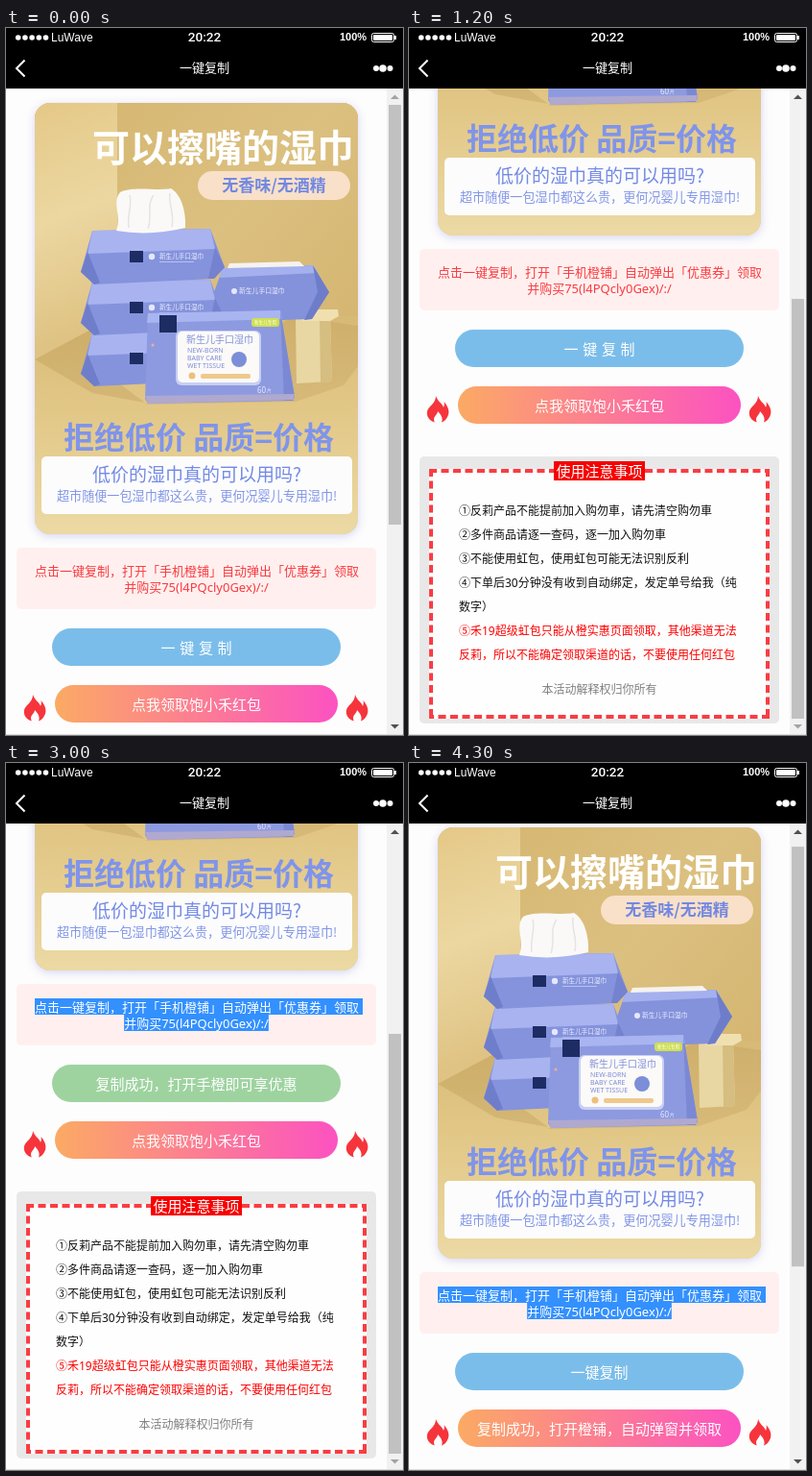
Write an HTML page with a canvas that moves like this. It is 414 px wide and 736 px high and loops after 4900 ms.

```html
<!DOCTYPE html>
<html lang="zh-CN">
<head>
<meta charset="utf-8">
<title>一键复制</title>
<style>
  html, body { margin: 0; width: 100%; height: 100%; overflow: hidden; background: #fdfdfd; }
  canvas { display: block; }
</style>
</head>
<body>
<canvas id="stage" width="414" height="736"></canvas>
<script>
const ctx = document.getElementById('stage').getContext('2d');
const W = 414, H = 736, TOP = 63, LOOP = 4900, PAGE = 984;
const SANS = '"Noto Sans", "Noto Sans CJK SC", sans-serif';
const CJK = '"Noto Sans CJK SC", sans-serif';

// [time, scroll offset]: the page jumps at each time and rests in between
const SCROLL = [
  [0, 0], [700, 25], [800, 62], [900, 100], [1000, 137], [1100, 230], [1200, 311],
  [1800, 168], [1900, 0], [2800, 100], [2900, 248], [3000, 311],
  [4100, 298], [4200, 150], [4300, 11]
];

const FLAME = new Path2D('M10 0C12 6 17 8 18 12C19 10 19 8 18.5 6C23 11 25 17 22 22' +
  'C20.5 25 18 27 16 27.5C18 23 15 19 12 16C12 19 8 21 8 24C8 26 8.5 27 9 27.5' +
  'C3 26 0 21 1 16C2 11 10 8 10 0Z');
const TISSUE = new Path2D('M115 211C121 196 110 182 119 171C132 164 158 170 172 167' +
  'C184 174 188 194 187 208Q150 217 115 211Z');
const FOLDS = new Path2D('M128 208C126 194 132 184 129 174M148 209C153 196 146 184 154 174' +
  'M173 207C176 194 169 182 171 172');

function rect(x, y, w, h, color) {
  ctx.fillStyle = color;
  ctx.fillRect(x, y, w, h);
}

function round(x, y, w, h, r, color) {
  ctx.beginPath();
  ctx.roundRect(x, y, w, h, r);
  ctx.fillStyle = color;
  ctx.fill();
}

function dot(x, y, r, color) {
  ctx.beginPath();
  ctx.arc(x, y, r, 0, Math.PI * 2);
  ctx.fillStyle = color;
  ctx.fill();
}

function trace(points, x = 0, y = 0) {
  ctx.beginPath();
  for (let i = 0; i < points.length; i += 2) ctx.lineTo(points[i] + x, points[i + 1] + y);
}

function poly(color, points, x, y) {
  trace(points, x, y);
  ctx.closePath();
  ctx.fillStyle = color;
  ctx.fill();
}

function line(color, width, points) {
  trace(points);
  ctx.strokeStyle = color;
  ctx.lineWidth = width;
  ctx.stroke();
}

function fade(x0, y0, x1, y1, ...colors) {
  const g = ctx.createLinearGradient(x0, y0, x1, y1);
  colors.forEach((c, i) => g.addColorStop(i / (colors.length - 1), c));
  return g;
}

// y is the middle of the glyphs
function text(str, x, y, size, color, { weight = 400, family = SANS, align = 'left', gap = 0 } = {}) {
  ctx.font = `${weight} ${size}px ${family}`;
  ctx.textAlign = align;
  ctx.letterSpacing = gap + 'px';
  ctx.fillStyle = color;
  ctx.fillText(str, x, y + size * 0.38);
}

function stackedPack(y) {
  poly('#8593dc', [12, 0, 135, -2, 150, 38, 139, 50, 14, 56, 0, 43], 78, y);
  poly('#a8b3f0', [12, 0, 135, -2, 140, 19, 7, 24], 78, y);
  poly('#6f7ecb', [7, 22, 20, 54, 14, 56, 0, 43], 78, y);
  poly('#7482cf', [140, 17, 150, 38, 139, 50, 133, 50], 78, y);
  rect(129, y + 21, 14, 12, '#1d2c62');
  dot(152, y + 27, 3.2, '#e4e8ff');
  text('新生儿手口湿巾', 160, y + 26, 6.6, '#eef0ff', { family: CJK });
  rect(160, y + 32, 36, 1, '#b9c2f3');
}

function frontPack() {
  poly('#8d9ae0', [148, 297, 286, 294, 301, 384, 299, 388, 148, 391, 145, 386]);
  poly('#a9b5f1', [148, 297, 286, 294, 288, 303, 147, 307]);
  poly('#7b89d5', [286, 294, 301, 384, 299, 388, 290, 388]);
  poly('#b0a9cf', [145, 383, 301, 381, 300, 387, 148, 391]);
  rect(160, 299, 18, 18, '#1d2c62');
  round(256, 302, 29, 9, 3, '#cfe052');
  text('新生儿专用', 259, 306.5, 4.6, '#ffffff', { family: CJK });
  dot(153, 330, 1.5, '#f3ad92');
  round(177, 315, 89, 57, 6, '#c9cff2');
  round(179, 316, 85, 53, 5, '#fbfaf8');
  text('新生儿手口湿巾', 188, 324, 10, '#8390da', { family: CJK });
  ['NEW-BORN', 'BABY CARE', 'WET TISSUE'].forEach((s, i) =>
    text(s, 189, 335 + i * 8, 7, '#7f8cd8', { weight: 500 }));
  dot(243, 345, 8, '#7d8ed8');
  dot(194, 362, 3.5, '#eebf7c');
  round(203, 360, 52, 5, 2, '#efc98c');
  text('60', 262, 377, 8, '#e8ebff');
  text('片', 272, 377.5, 5, '#e8ebff', { family: CJK });
}

function sidePack() {
  poly('#e8d7a3', [302, 303, 338, 300, 340, 368, 303, 370]);
  poly('#d6bd80', [327, 301, 338, 300, 340, 368, 328, 369]);
  poly('#f0e0b0', [309, 293, 346, 293, 347, 300, 338, 305, 309, 305]);
  poly('#8492db', [226, 250, 320, 247, 337, 275, 319, 303, 224, 306, 213, 286]);
  poly('#a5b0ee', [226, 250, 320, 247, 325, 255, 222, 260]);
  poly('#6e7dca', [320, 247, 337, 275, 319, 303, 311, 304, 325, 275]);
  poly('#f6f3ef', [233, 245, 306, 243, 311, 248, 231, 250]);
  dot(238, 274, 3, '#e4e8ff');
  text('新生儿手口湿巾', 243, 273, 6.8, '#eef0ff', { family: CJK });
}

function photo() {
  ctx.save();
  ctx.beginPath();
  ctx.roundRect(30, 78, 337, 449, 16);
  ctx.save();
  ctx.shadowColor = 'rgba(120,120,220,.3)';
  ctx.shadowBlur = 10;
  ctx.shadowOffsetY = 2;
  ctx.fillStyle = '#e4ca8b';
  ctx.fill();
  ctx.restore();
  ctx.clip();

  rect(30, 78, 337, 449, fade(0, 290, 0, 527, '#d6b874', '#e3c989', '#ecd9a4'));
  rect(116, 78, 251, 222, fade(116, 78, 367, 300, '#d6b873', '#dcc080', '#d5b672'));
  poly(fade(30, 78, 116, 300, '#e4c887', '#ecd7a1', '#dfc384'), [30, 78, 116, 78, 116, 300, 30, 345]);
  poly('rgba(160,120,50,.16)', [145, 392, 302, 389, 352, 372, 367, 352, 367, 310, 300, 300]);
  poly('rgba(160,120,50,.2)', [30, 345, 90, 313, 84, 345, 145, 390, 90, 380]);

  sidePack();
  [317, 264, 211].forEach(stackedPack);
  ctx.fillStyle = '#faf9f7';
  ctx.fill(TISSUE);
  ctx.strokeStyle = '#e6e3e2';
  ctx.lineWidth = 1.5;
  ctx.stroke(FOLDS);
  frontPack();

  text('可以擦嘴的湿巾', 90, 124.5, 39, '#ffffff', { weight: 700, family: CJK });
  round(200, 149, 159, 30, 15, '#f9e0c8');
  text('无香味/无酒精', 279.5, 164, 17, '#7188e2', { weight: 700, family: CJK, align: 'center' });
  text('拒绝低价 品质=价格', 201, 426, 32, '#7f94ea', { weight: 700, family: CJK, align: 'center' });
  round(37, 446, 324, 60, 5, '#fcfcfd');
  text('低价的湿巾真的可以用吗?', 90, 465, 19, '#738ae5', { weight: 500, family: CJK });
  text('超市随便一包湿巾都这么贵，更何况婴儿专用湿巾!', 53, 487, 13.1, '#8296e6', { family: CJK });
  ctx.restore();
}

function tip(selected) {
  round(11, 541, 375, 64, 5, '#fff0ef');
  const code = '并购买75(l4PQcly0Gex)/:/';
  const color = selected ? '#ffffff' : '#fa3a3f';
  if (selected) {
    ctx.font = '13px ' + SANS;
    ctx.letterSpacing = '0px';
    const w = ctx.measureText(code).width;
    rect(30, 556, 342, 17, '#3390ff');
    rect(198.5 - w / 2, 573, w, 17, '#3390ff');
  }
  text('点击一键复制，打开「手机橙铺」自动弹出「优惠券」领取', 30, 565, 13, color);
  text(code, 198.5, 582, 13, color, { align: 'center' });
}

function flame(x) {
  ctx.save();
  ctx.translate(x, 694);
  ctx.fillStyle = '#f6343b';
  ctx.fill(FLAME);
  ctx.restore();
}

function buttons(t) {
  const mid = { align: 'center' };
  const copied = t >= 2500 && t < 4100;
  round(48, 625, 301, 39, 19.5, copied ? '#9ed3a0' : '#7bbdea');
  if (copied) text('复制成功，打开手橙即可享优惠', 198.5, 645, 15, '#fff', mid);
  else if (t < 2500) text('一键复制', 161.5, 645, 15, '#fff', { gap: 4.7 });
  else text('一键复制', 198.5, 645, 15, '#fff', mid);

  round(51, 684, 295, 39, 19.5, fade(51, 0, 346, 0, '#fbaa64', '#fc52c1'));
  text(t < 3800 ? '点我领取饱小禾红包' : '复制成功，打开橙铺，自动弹窗并领取', 198.5, 704, 15, '#fff', mid);
  flame(18);
  flame(354);
}

function notice() {
  round(11, 757, 375, 278, 5, '#e8e8e8');
  rect(21, 770, 355, 260, '#fefefe');
  ctx.setLineDash([8, 4.5]);
  line('#fa3c42', 4, [21, 772, 376, 772]);
  line('#fa3c42', 4, [376, 1028, 21, 1028]);
  line('#fa3c42', 4, [23, 770, 23, 1030]);
  line('#fa3c42', 4, [374, 770, 374, 1030]);
  ctx.setLineDash([]);
  rect(151, 762, 95, 20, '#f60000');
  text('使用注意事项', 198.5, 772, 15, '#fff', { align: 'center' });
  [
    '①反莉产品不能提前加入购勿車，请先清空购勿車',
    '②多件商品请逐一查码，逐一加入购勿車',
    '③不能使用虹包，使用虹包可能无法识别反利',
    '④下单后30分钟没有收到自动绑定，发定单号给我（纯',
    '数字）',
    '⑤禾19超级虹包只能从橙实惠页面领取，其他渠道无法',
    '反莉，所以不能确定领取渠道的话，不要使用任何红包'
  ].forEach((s, i) => text(s, 52, 813 + i * 25, 12, i < 5 ? '#111' : '#fe0000'));
  text('本活动解释权归你所有', 198.5, 999, 12, '#808080', { align: 'center' });
}

function scrollbar(offset) {
  const view = H - TOP, max = PAGE - view, track = view - 34;
  const arrow = on => on ? '#505050' : '#a3a3a3';
  rect(397, TOP, 17, view, '#f1f1f1');
  rect(399, TOP + 17 + offset * track / PAGE, 13, view * track / PAGE, '#c1c1c1');
  poly(arrow(offset > 0), [401, 74, 405.5, 69.5, 410, 74]);
  poly(arrow(offset < max), [401, 725, 405.5, 729.5, 410, 725]);
}

function header() {
  const arial = '"Liberation Sans", Arial, sans-serif';
  rect(0, 0, W, TOP, '#000');
  for (let i = 0; i < 5; i++) dot(12.7 + i * 7.2, 10, 2.8, '#fff');
  text('LuWave', 47, 9, 12, '#fff', { family: arial });
  text('20:22', 207, 8.8, 13.6, '#fff', { weight: 500, family: 'Roboto, sans-serif', align: 'center' });
  text('100%', 348, 9, 11, '#fff', { weight: 700, family: arial });
  ctx.beginPath();
  ctx.roundRect(381.5, 5.5, 23, 9, 2);
  ctx.strokeStyle = '#fff';
  ctx.lineWidth = 1;
  ctx.stroke();
  round(383, 7, 20, 6, 1, '#fff');
  rect(405, 8, 2, 4, '#fff');
  line('#fff', 2, [19.5, 33.5, 11, 42, 19.5, 50.5]);
  text('一键复制', 207, 41, 13, '#fff', { align: 'center' });
  dot(386, 42, 3, '#fff');
  dot(393, 42, 3.8, '#fff');
  dot(400.5, 42, 3, '#fff');
}

function draw(t) {
  const offset = SCROLL.findLast(k => k[0] <= t)[1];
  const selected = t >= 2500 && !(t >= 3800 && t < 3900);
  rect(0, 0, W, H, '#fdfdfd');
  ctx.save();
  ctx.translate(0, -offset);
  photo();
  tip(selected);
  buttons(t);
  notice();
  ctx.restore();
  scrollbar(offset);
  rect(0, H - 1, W, 1, '#dedede');
  header();
}

const start = performance.now();
function tick() {
  draw((performance.now() - start) % LOOP);
  requestAnimationFrame(tick);
}
tick();
</script>
</body>
</html>
```
